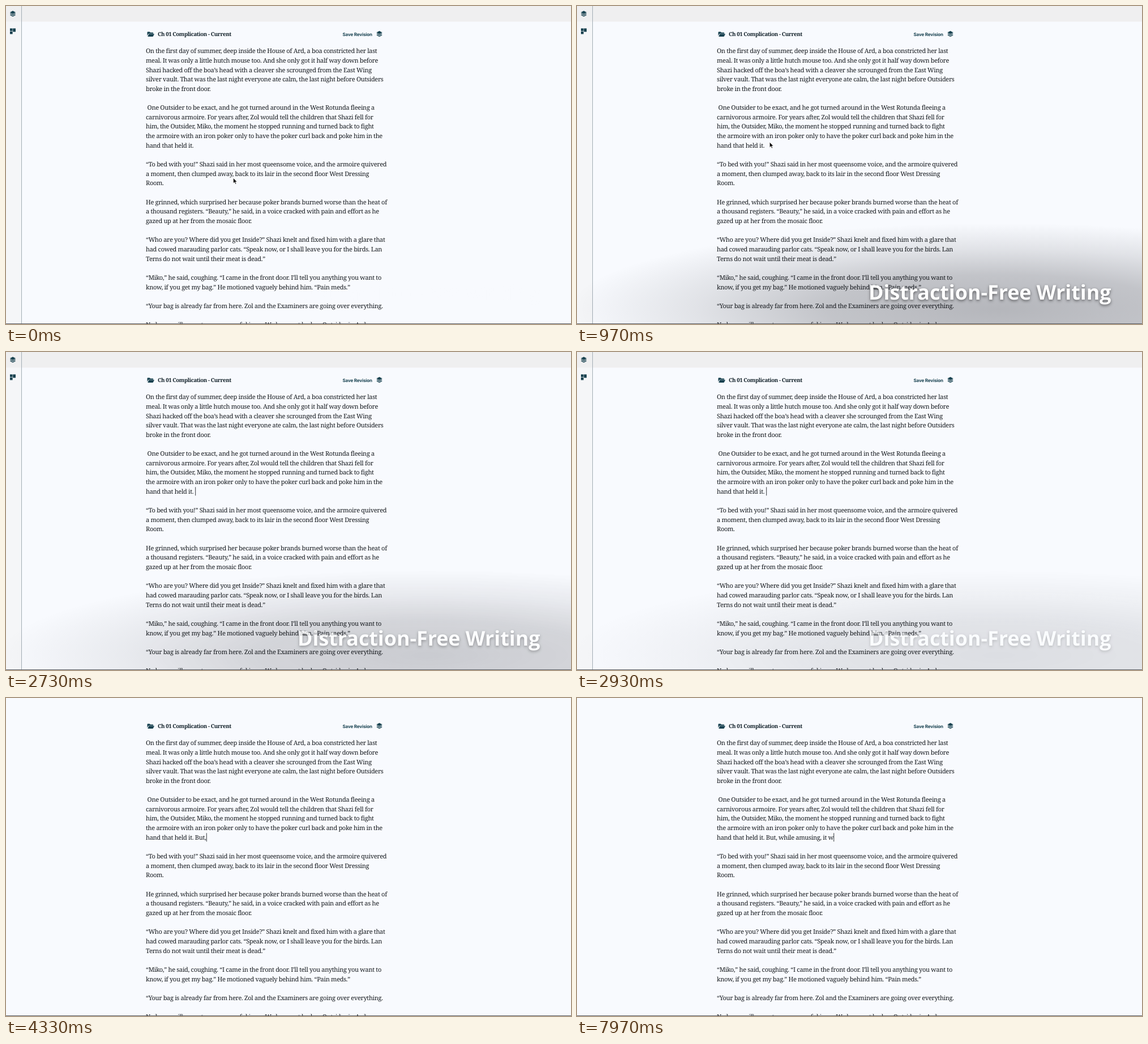
An HTML page for the animation above (8 s loop, 998 by 561 pixels).

```html
<!DOCTYPE html>
<html lang="en">
<head>
<meta charset="utf-8">
<title>Distraction-Free Writing</title>
<style>
  html, body { margin: 0; width: 100%; height: 100%; overflow: hidden; background: #f8fafe; }
  svg { display: block; width: 100%; height: 100%; }
  text { white-space: pre; text-rendering: geometricPrecision; }
  .body { font: 11px "Noto Serif", serif; letter-spacing: -.3px; fill: #15191d; }
  .title { font: bold 9.7px "Noto Serif", serif; letter-spacing: -.42px; fill: #14232b; }
  .save { font: bold 8px Inter, sans-serif; letter-spacing: -.15px; fill: #17414f; }
  .caption { font: bold 35.8px "Open Sans", sans-serif; fill: #fff;
    filter: drop-shadow(0 2px 2.5px rgba(0, 0, 0, .5)); }
  .icon { fill: #17414f; }
</style>
</head>
<body>
<svg viewBox="0 0 998 561" preserveAspectRatio="xMidYMid meet">
  <defs>
    <radialGradient id="shade">
      <stop offset="0" stop-color="#101018" stop-opacity=".29"/>
      <stop offset=".4" stop-color="#101018" stop-opacity=".23"/>
      <stop offset=".7" stop-color="#101018" stop-opacity=".1"/>
      <stop offset="1" stop-color="#101018" stop-opacity="0"/>
    </radialGradient>
    <g id="layers" class="icon">
      <path d="M0-5.4 5.2-2.7 0 0-5.2-2.7Z"/>
      <path d="M-5.2-.6-3.7-1.3 0 .8 3.7-1.3 5.2-.6 0 2.2Z"/>
      <path d="M-5.2 2-3.7 1.3 0 3.3 3.7 1.3 5.2 2 0 4.8Z"/>
    </g>
  </defs>
  <rect width="998" height="561" fill="#f8fafe"/>
  <g id="chrome">
    <rect width="27" height="561" fill="#f5f6f8"/>
    <rect width="998" height="27.5" fill="#efeff0"/>
    <rect x="27" width="1" height="561" fill="#a3adb5"/>
    <use href="#layers" x="12" y="14"/>
    <path class="icon" d="M7 39.5h4.6v4.6H7ZM12.2 39.5h4.8v6h-4.8ZM7 44.7h4.6v4.8H7Z"/>
  </g>
  <path class="icon" d="M249.5 52.5v-6q0-1 1-1h3.2l1.3 1.3h4.2q1 0 1 1v.9h-7.8q-.7 0-1 .6Z"/>
  <path class="icon" d="M252.4 49.2h9.6l-2 4.1q-.3.6-1 .6h-8.8Z"/>
  <text class="title" x="268" y="53">Ch 01 Complication - Current</text>
  <text class="save" x="594.5" y="52.5">Save Revision</text>
  <use href="#layers" x="659.5" y="49.5"/>
  <g id="page" class="body"></g>
  <rect id="caret" y="238.3" width="1" height="15" fill="#15191d"/>
  <g id="overlay">
    <ellipse cx="745" cy="535" rx="760" ry="152" fill="url(#shade)"/>
    <text class="caption" x="515" y="517.5">Distraction-Free Writing</text>
  </g>
  <path id="mouse" d="M0 0V9.2L2.2 7.3 3.7 10.7 5.2 10 3.7 6.8H6.6Z"
        fill="#0b0b0b" stroke="#fff" stroke-width=".6"/>
  <rect y="560" width="998" height="1" fill="#5b5f66"/>
</svg>
<script>
const LOOP = 8000, LEFT = 247, TOP = 83.2, PITCH = 16.66, TYPED_ROW = 10;
const $ = id => document.getElementById(id);

const rows = `On the first day of summer, deep inside the House of Ard, a boa constricted her last
meal. It was only a little hutch mouse too. And she only got it half way down before
Shazi hacked off the boa’s head with a cleaver she scrounged from the East Wing
silver vault. That was the last night everyone ate calm, the last night before Outsiders
broke in the front door.

 One Outsider to be exact, and he got turned around in the West Rotunda fleeing a
carnivorous armoire. For years after, Zol would tell the children that Shazi fell for
him, the Outsider, Miko, the moment he stopped running and turned back to fight
the armoire with an iron poker only to have the poker curl back and poke him in the
hand that held it.

“To bed with you!” Shazi said in her most queensome voice, and the armoire quivered
a moment, then clumped away, back to its lair in the second floor West Dressing
Room.

He grinned, which surprised her because poker brands burned worse than the heat of
a thousand registers. “Beauty,” he said, in a voice cracked with pain and effort as he
gazed up at her from the mosaic floor.

“Who are you? Where did you get Inside?” Shazi knelt and fixed him with a glare that
had cowed marauding parlor cats. “Speak now, or I shall leave you for the birds. Lan
Terns do not wait until their meat is dead.”

“Miko,” he said, coughing. “I came in the front door. I’ll tell you anything you want to
know, if you get my bag.” He motioned vaguely behind him. “Pain meds.”

“Your bag is already far from here. Zol and the Examiners are going over everything.

No harm will come to you so careful in us. We have not had an Outsider in Ard`.split("\n");

const lines = rows.map((row, i) => {
  const el = document.createElementNS("http://www.w3.org/2000/svg", "text");
  el.setAttribute("x", LEFT);
  el.setAttribute("y", TOP + i * PITCH);
  el.textContent = row;
  $("page").append(el);
  return el;
});

// Bursts of typing: text, first key, last key
const bursts = [[" ", 2600, 2600], ["But,", 3450, 4150], [" while am", 4650, 5650], ["using, it w", 6400, 7900]];
const keys = bursts.flatMap(([s, a, b]) =>
  [...s].map((char, i) => ({ char, at: a + (b - a) * i / Math.max(1, s.length - 1) })));

const path = [[0, 401.5, 303.5], [60, 401.5, 303.5], [330, 392, 277], [1000, 340, 240]];

const clamp = v => Math.min(1, Math.max(0, v));
const ramp = (t, a, b) => clamp((t - a) / (b - a));
const smooth = v => v * v * (3 - 2 * v);

function mouseAt(t) {
  const i = Math.max(1, path.findIndex(p => p[0] >= t));
  if (t >= path.at(-1)[0]) return path.at(-1).slice(1);
  const [a, b] = [path[i - 1], path[i]], k = smooth(ramp(t, a[0], b[0]));
  return [a[1] + (b[1] - a[1]) * k, a[2] + (b[2] - a[2]) * k];
}

let shown = -1, caretX = 0;
function type(count) {
  if (count === shown) return;
  shown = count;
  const line = lines[TYPED_ROW];
  line.textContent = rows[TYPED_ROW] + keys.slice(0, count).map(k => k.char).join("");
  caretX = LEFT + line.getComputedTextLength() + .3;
}

function draw(t) {
  const count = keys.filter(k => k.at <= t).length;
  type(count);
  const idle = count ? t - keys[count - 1].at : 0;
  $("caret").setAttribute("x", caretX);
  $("caret").setAttribute("opacity", count && idle % 1000 < 500 ? .85 : 0);

  $("overlay").setAttribute("opacity", ramp(t, 0, 460) * (1 - ramp(t, 2500, 3230)));
  $("chrome").setAttribute("opacity", 1 - smooth(ramp(t, 3500, 4100)));

  $("mouse").setAttribute("transform", `translate(${mouseAt(t)})`);
  $("mouse").setAttribute("opacity", count ? 0 : 1);
}

const start = performance.now();
function tick() {
  draw((performance.now() - start) % LOOP);
  requestAnimationFrame(tick);
}
tick();
</script>
</body>
</html>
```
